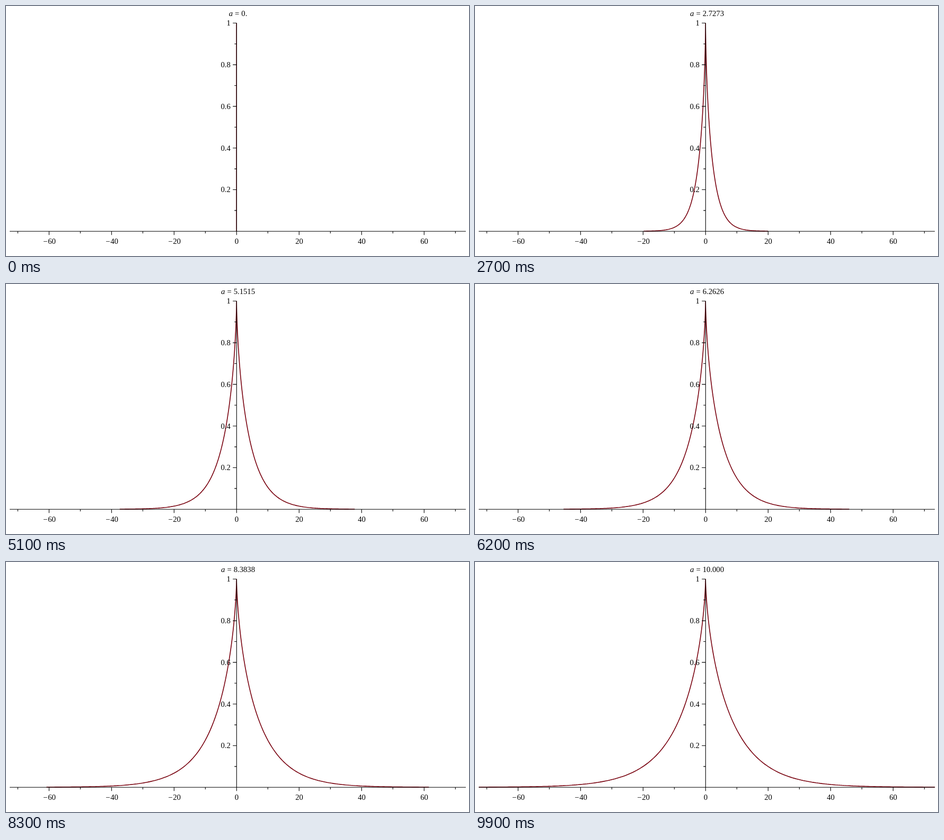
These frames come from a looping animation (874 by 473 pixels, 10000 ms). An HTML page with a canvas:

```html
<!DOCTYPE html>
<html lang="en">
<head>
<meta charset="utf-8">
<title>Tractrix</title>
<style>
html, body { margin: 0; width: 100%; height: 100%; overflow: hidden; background: #fff; }
canvas { display: block; }
</style>
</head>
<body>
<canvas id="plot" width="874" height="473"></canvas>
<script>
const ctx = document.getElementById('plot').getContext('2d');
const X0 = 435.2, Y0 = 426.2, SX = 5.9, SY = 394;
const STEPS = 100, STEP_MS = 100, MAX_A = 10;
const SIZE = 14.667;
const FONT = SIZE + 'px "Liberation Serif", "Times New Roman", serif';

function line(x1, y1, x2, y2) {
  ctx.moveTo(x1, y1);
  ctx.lineTo(x2, y2);
}

// Draws left-aligned text and returns the x where it ends.
function write(text, x, y, font = FONT) {
  ctx.font = font;
  ctx.fillText(text, x, y);
  return x + ctx.measureText(text).width;
}

function widthOf(text) {
  ctx.font = FONT;
  return ctx.measureText(text).width;
}

function drawAxes() {
  ctx.strokeStyle = '#000';
  ctx.lineWidth = 1.1;
  ctx.beginPath();
  // The axes sit a fraction off the pixel grid, like the curve.
  const x0 = X0 + 0.1, y0 = Y0 + 0.1;
  line(7, y0, 868, y0);
  line(x0, Y0 - SY, x0, Y0);

  for (let v = -70; v <= 70; v += 10) {
    const x = x0 + v * SX;
    line(x, Y0, x, Y0 + (v % 20 ? 4 : 7));
  }
  for (let i = 0; i <= 10; i++) {
    const y = y0 - i / 10 * SY;
    line(X0 - (i % 2 ? 4 : 7), y, X0, y);
  }
  ctx.stroke();
}

function drawLabels() {
  for (let v = -60; v <= 60; v += 20) {
    const digits = String(Math.abs(v));
    const x = X0 + v * SX + 0.3;
    if (v < 0) {
      const end = write('\u2212', x - 11.5, 450);
      write(digits, end + 1, 450);
    } else {
      write(digits, x - widthOf(digits) / 2, 450);
    }
  }
  for (let i = 2; i <= 10; i += 2) {
    const text = String(i / 10);
    write(text, 423.8 - widthOf(text), Math.round(Y0 - i / 10 * SY) + 5);
  }
}

function drawTitle(a) {
  const value = a ? a.toPrecision(5) : '0.';
  const gap = SIZE * 5 / 18;
  const width = SIZE / 2 + widthOf('=') + widthOf(value) + 2 * gap;
  let x = write('a', 438 - width / 2, 19, 'italic ' + FONT);
  x = write('=', x + gap, 19);
  write(value, x + gap, 19);
}

function drawCurve(a) {
  const from = -8.254, to = 8.34, n = 240;
  ctx.beginPath();
  for (let i = 0; i <= n; i++) {
    const u = from + (to - from) * i / n;
    ctx.lineTo(X0 + a * SX * (u - Math.tanh(u)), Y0 - SY / Math.cosh(u));
  }
  ctx.strokeStyle = '#78000e';
  ctx.lineWidth = 1.6;
  ctx.lineJoin = 'bevel';
  ctx.stroke();
}

function draw(ms) {
  const a = MAX_A * (Math.floor(ms / STEP_MS) % STEPS) / (STEPS - 1);
  ctx.fillStyle = '#fff';
  ctx.fillRect(0, 0, 874, 473);
  ctx.fillStyle = '#000';
  drawCurve(a);
  drawAxes();
  drawLabels();
  drawTitle(a);
}

const start = performance.now();
function tick() {
  draw(performance.now() - start);
  requestAnimationFrame(tick);
}
tick();
</script>
</body>
</html>
```
